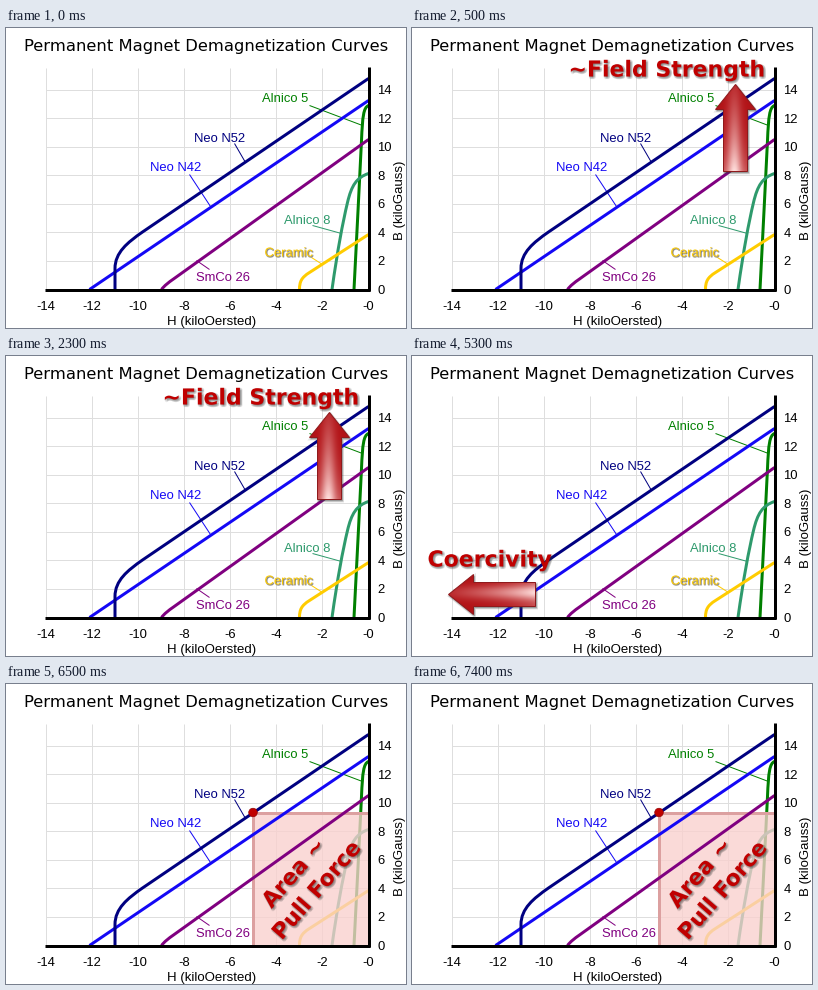
Recreate the animation shown at these times as a matplotlib script. Size 400 by 300 pixels, loop 8000 ms.

```python
import numpy as np
import matplotlib.pyplot as plt
from matplotlib.animation import FuncAnimation
from matplotlib.patches import Circle, PathPatch, Polygon, Rectangle
from matplotlib.path import Path
from matplotlib.patheffects import Normal, SimplePatchShadow

W, H, DPI = 400, 300, 100
PT = 72 / DPI  # points per pixel
STEP = 500
STARTS = (0, 500, 3500, 6500)

NAVY, BLUE, PURPLE = "#000080", "#1408f5", "#800080"
GREEN, TEAL, GOLD, RED = "#008000", "#2e9a6c", "#ffcc00", "#c00000"

fig = plt.figure(figsize=(W / DPI, H / DPI), dpi=DPI, facecolor="white")
ax = fig.add_axes([0, 0, 1, 1])
ax.axis("off")


def px(h):
    return 39 + (h + 14) * 323 / 14


def py(b):
    return 261 - b * 200 / 14


def line(points, color, width=1, z=2):
    x, y = zip(*points)
    return ax.plot(x, y, color=color, lw=width * PT, zorder=z,
                   solid_capstyle="butt", solid_joinstyle="round")[0]


def curve(points, color, z):
    """Start point, cubic segments of three points each, then straight ends."""
    n = (len(points) - 1) // 3 * 3
    codes = [Path.MOVETO] + [Path.CURVE4] * n
    codes += [Path.LINETO] * (len(points) - len(codes))
    return ax.add_patch(PathPatch(Path(points, codes), fc="none", ec=color,
                                  lw=3 * PT, capstyle="butt", zorder=z))


def text(x, y, s, size=13, color="black", font="Liberation Sans", **kw):
    kw = {"va": "baseline", "zorder": 8, **kw}
    return ax.text(x, y, s, fontsize=size * PT, color=color, family=font, **kw)


def soft_shadow(shift, radius, alpha):
    """A ring of faint copies stands in for a blurred shadow."""
    ring = [(shift + radius * np.cos(a), shift + radius * np.sin(a))
            for a in np.arange(8) * np.pi / 4]
    return [SimplePatchShadow(offset=(dx * PT, -dy * PT), alpha=alpha,
                              shadow_rgbFace="#303030")
            for dx, dy in ring] + [Normal()]


def caption(x, y, s, **kw):
    return text(x, y, s, 22, RED, "DejaVu Sans", weight="bold", zorder=12,
                path_effects=soft_shadow(1.3, 1.3, 0.11), **kw)


def arrow(tip, upward):
    """Glossy arrow, 87 long and 40 across, pointing up or left."""
    tx, ty = tip
    shape = np.array([(0, 0), (25, 20), (25, 12), (87, 12),
                      (87, -12), (25, -12), (25, -20)], float)
    along, across = shape.T
    if upward:
        xy = np.c_[tx + across, ty + along]
        extent = (tx - 20, tx + 20, ty + 87, ty)
    else:
        xy = np.c_[tx + along, ty + across]
        extent = (tx, tx + 87, ty + 20, ty - 20)

    s, t = np.meshgrid(np.linspace(0, 1, 174), np.linspace(-1, 1, 80),
                       indexing="ij")
    gloss = np.exp(-((t + 0.08) / 0.36) ** 2) * (0.12 + 0.6 * s)
    gloss = np.clip(gloss + 0.28 * s ** 3, 0, 1)[..., None]
    img = np.array([178, 18, 22]) * (1 - gloss) + np.array([255, 222, 220]) * gloss
    img = img / 255
    if not upward:
        img = img.transpose(1, 0, 2)

    parts = []
    for w in (3, 2, 1):
        parts.append(ax.add_patch(Polygon(xy + (1, 1.5), fc="#404040", ec="#404040",
                                          lw=w * PT, alpha=0.13, zorder=9)))
    fill = ax.imshow(img, extent=extent, aspect="auto", zorder=10,
                     interpolation="bilinear")
    edge = ax.add_patch(Polygon(xy, fc="none", ec="#8e1a1c", lw=PT, zorder=11))
    fill.set_clip_path(edge)
    return parts + [fill, edge]


# Grid, axes and their labels
for v in range(0, 15, 2):
    x, y = px(-v), py(v)
    line([(x, 39), (x, 261)], "#dedede", z=0)
    line([(39, y), (362, y)], "#dedede", z=0)
    text(x, 281, f"-{v}", ha="center")
    text(371, y + 4.5, str(v))
line([(362, 38), (362, 262.5)], "black", 3, 7)
line([(38.5, 261), (363.5, 261)], "black", 3, 7)
text(199.5, 23, "Permanent Magnet Demagnetization Curves", 16.4,
     font="DejaVu Sans", ha="center")
text(205.5, 297, "H (kiloOersted)", 13.2, ha="center")
text(396, 172, "B (kiloGauss)", 13.2, ha="center", rotation=90,
     rotation_mode="anchor")

# Demagnetization curves
curve([(347.5, 261), (350, 215), (353, 150), (355, 112),
       (356, 88), (357, 79), (362, 77)], GREEN, 2)
curve([(325.5, 261), (331, 222), (336, 195), (341, 174),
       (345, 157), (350, 149), (362, 145)], TEAL, 2)
curve([(293, 261), (293, 253), (295, 249), (303, 244), (362, 206)], GOLD, 2)
curve([(155, 261), (158, 257), (162, 254), (167, 250.5), (362, 111)], PURPLE, 6)
line([(83, 261), (362, 72)], BLUE, 3, 6)
curve([(108.5, 261), (108.5, 254), (108.5, 247), (108.5, 240),
       (108.5, 224), (121, 214), (136, 203.5), (362, 50)], NAVY, 6)

# Curve names with leader lines
text(188, 113, "Neo N52", color=NAVY)
line([(228, 115), (239, 134)], NAVY)
text(144, 142.5, "Neo N42", color=BLUE)
line([(183, 146), (204, 178)], BLUE)
text(190, 252.5, "SmCo 26", color=PURPLE)
line([(190, 232), (203, 241)], PURPLE)
text(255, 74, "Alnico 5", color=GREEN)
line([(303, 77), (356, 97)], GREEN)
covered = [
    text(278, 195, "Alnico 8", color=TEAL),
    line([(306, 197), (335, 205)], TEAL),
    text(258, 228, "Ceramic", color=GOLD,
         path_effects=soft_shadow(0.8, 0.5, 0.13)),
    line([(305, 229), (316, 236)], GOLD),
]

# Overlays, one group per phase
strength = [caption(156, 48, "~Field Strength")] + arrow((323, 56), True)
coercivity = [caption(15, 210, "Coercivity")] + arrow((36, 238), False)
tilt = dict(rotation=49, rotation_mode="anchor", ha="center", va="center")
area = [
    ax.add_patch(Rectangle((246.5, 128), 115.5, 133, fc="#f9d0ce",
                           alpha=0.78, lw=0, zorder=4)),
    line([(246.5, 261), (246.5, 128), (362, 128)], "#dca0a0", 3, 5),
    ax.add_patch(Circle((246.5, 128), 4.3, fc=RED, ec="#8e0000",
                        lw=0.6 * PT, zorder=11)),
    caption(288, 189, "Area ~", **tilt),
    caption(311, 206, "Pull Force", **tilt),
]
groups = [[], strength, coercivity, area]

ax.set_xlim(-0.5, W - 0.5)
ax.set_ylim(H - 0.5, -0.5)


def draw(i):
    phase = sum(i * STEP >= t for t in STARTS) - 1
    for k, group in enumerate(groups):
        for artist in group:
            artist.set_visible(k == phase)
    for artist in covered:
        artist.set_visible(phase != 3)
    return []


anim = FuncAnimation(fig, draw, frames=16, interval=STEP, repeat=True,
                     repeat_delay=0, blit=False)
plt.show()
```
